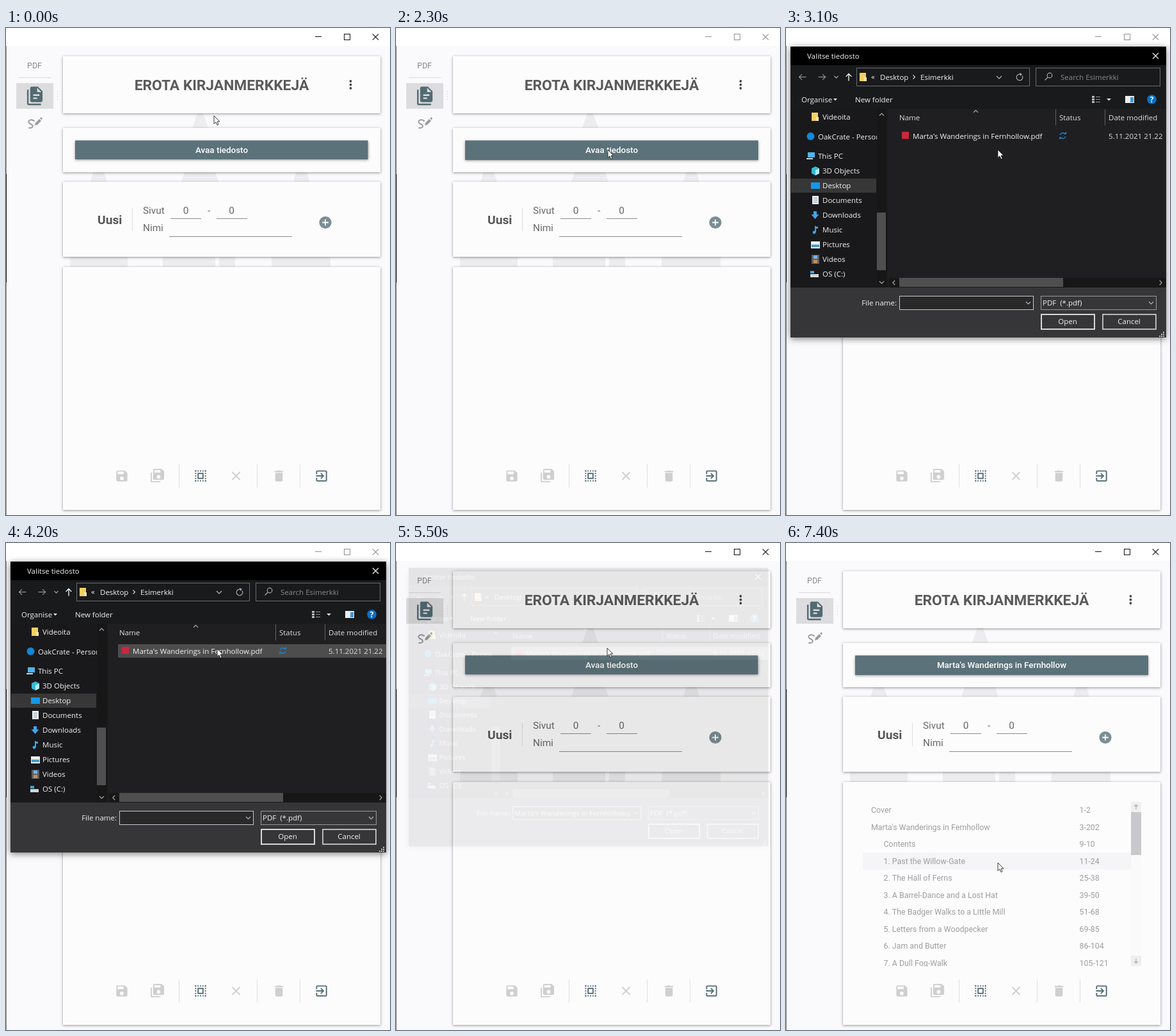
Animation, 600 px wide and 760 px high, one loop 7.6 s. Source, as an HTML page with a canvas:

```html
<!DOCTYPE html>
<html lang="fi">
<head>
<meta charset="utf-8">
<title>Erota kirjanmerkkejä</title>
<style>
html, body { margin: 0; width: 100%; height: 100%; overflow: hidden; background: #fff; }
canvas { display: block; width: 600px; height: 760px; }
</style>
</head>
<body>
<canvas id="stage" width="600" height="760"></canvas>
<script>
const LOOP = 7600, STEP = 100;
const BOOK = "Marta's Wanderings in Fernhollow";
const APP = 'Roboto, sans-serif', SYS = '"Open Sans", "Noto Sans", sans-serif';
const OPEN_AT = 2400, CLOSE_AT = 5400, LIST_AT = 5900;
const main = document.getElementById('stage').getContext('2d');
const layer = document.createElement('canvas');
layer.width = 600; layer.height = 760;
const layerCtx = layer.getContext('2d');
let g = main;

const ICON = {
  save: 'M17 3H5c-1.11 0-2 .9-2 2v14c0 1.1.89 2 2 2h14c1.1 0 2-.9 2-2V7zM12 19a3 3 0 1 1 0-6 3 3 0 0 1 0 6zM15 9H5V5h10z',
  saveAll: 'M17 7V3H7v4zM14 17a3 3 0 1 0 0-6 3 3 0 0 0 0 6zM19 1l4 4v12a2 2 0 0 1-2 2H7c-1.1 0-2-.9-2-2V3a2 2 0 0 1 2-2zM1 7h2v14h14v2H3a2 2 0 0 1-2-2z',
  trash: 'M6 19c0 1.1.9 2 2 2h8c1.1 0 2-.9 2-2V7H6zM19 4h-3.5l-1-1h-5l-1 1H5v2h14z',
  exit: 'M10.1 15.6L11.5 17l5-5-5-5-1.4 1.4 2.6 2.6H3v2h9.7zM19 3H5c-1.1 0-2 .9-2 2v4h2V5h14v14H5v-4H3v4c0 1.1.9 2 2 2h14c1.1 0 2-.9 2-2V5c0-1.1-.9-2-2-2z',
  docs: 'M8 0h8l6 6v12a2 2 0 0 1-2 2H8a2 2 0 0 1-2-2V2a2 2 0 0 1 2-2zM15 1.5V7h5.5zM10 10v2h8v-2zM10 14v2h5v-2zM4 4v18h16v2H4a2 2 0 0 1-2-2V4z',
  add: 'M12 2a10 10 0 1 0 0 20 10 10 0 0 0 0-20zM11 7h2v4h4v2h-4v4h-2v-4H7v-2h4z'
};
for (const k in ICON) ICON[k] = new Path2D(ICON[k]);

function rect(x, y, w, h, c) { g.fillStyle = c; g.fillRect(x, y, w, h); }
function box(x, y, w, h, c, lw = 1) { g.strokeStyle = c; g.lineWidth = lw; g.strokeRect(x + .5, y + .5, w - 1, h - 1); }
function disc(x, y, r, c) { g.fillStyle = c; g.beginPath(); g.arc(x, y, r, 0, 7); g.fill(); }
function poly(pts, fill, stroke, lw = 1) {
  g.beginPath();
  pts.forEach(([x, y], i) => i ? g.lineTo(x, y) : g.moveTo(x, y));
  if (fill) { g.closePath(); g.fillStyle = fill; g.fill(); }
  if (stroke) { g.strokeStyle = stroke; g.lineWidth = lw; g.stroke(); }
}
function text(s, x, y, font, c, align = 'left') {
  g.font = font; g.fillStyle = c; g.textAlign = align; g.fillText(s, x, y);
}
function sys(s, x, y, c = '#f2f2f2', align) { text(s, x, y, '11.5px ' + SYS, c, align); }
function icon(name, cx, cy, c, size = 23) {
  g.save();
  g.translate(cx - size / 2, cy - size / 2);
  g.scale(size / 24, size / 24);
  g.fillStyle = c; g.fill(ICON[name], 'evenodd');
  g.restore();
}
function chevron(x, y, dir, c, r = 3) {
  const turn = { down: 0, left: 1, up: 2, right: 3 }[dir] * Math.PI / 2;
  g.save(); g.translate(x, y); g.rotate(turn);
  poly([[-r, -r / 2], [0, r / 2], [r, -r / 2]], null, c, 1.1);
  g.restore();
}
function arrow(x, y, dir, c, r = 5.5) {
  g.save(); g.translate(x, y); g.rotate({ right: 0, left: Math.PI, up: -Math.PI / 2, down: Math.PI / 2 }[dir]);
  poly([[-r, 0], [r, 0]], null, c, 1.3);
  poly([[r * .2, -r * .8], [r, 0], [r * .2, r * .8]], null, c, 1.3);
  g.restore();
}
function cross(x, y, r, c, lw = 1.1) {
  poly([[x - r, y - r], [x + r, y + r]], null, c, lw);
  poly([[x + r, y - r], [x - r, y + r]], null, c, lw);
}
const smooth = (a, b, t) => { const p = Math.min(1, Math.max(0, (t - a) / (b - a))); return p * p * (3 - 2 * p); };

function card(x, y, w, h, c = '#fdfcfd') {
  g.save();
  g.shadowColor = 'rgba(0,0,0,.42)'; g.shadowBlur = 4; g.shadowOffsetY = 1;
  rect(x, y, w, h, c);
  g.restore();
}

function backdrop() {
  rect(0, 0, 600, 760, '#faf9fb');
  // pale figures that show between the cards
  const c = '#ededef';
  poly([[299, 133], [308, 133], [316, 156], [291, 156]], c);
  poly([[137, 225], [153, 225], [158, 240], [132, 240]], c);
  poly([[279, 225], [327, 225], [332, 240], [274, 240]], c);
  poly([[453, 225], [470, 225], [474, 240], [449, 240]], c);
  [[100, 90], [245, 82], [333, 25], [415, 92]].forEach(([x, w]) => rect(x, 357, w, 16, c));
  rect(0, 0, 600, 28, '#fff');
  rect(0, 28, 1, 732, '#8a8a8c');
  rect(0, 228, 1, 169, '#111');
}

function windowButtons(active) {
  const c = active ? '#111' : '#8f8f8f';
  rect(483, 13, 10, 1, c);
  box(528, 9, 10, 10, c);
  cross(577.5, 14, 4.7, c);
}

function sidebar() {
  text('PDF', 33, 63, '12.5px ' + APP, '#8b8b8d');
  rect(20, 77, 50, 1, '#dadadc');
  rect(16, 86, 58, 40, '#dcdcde');
  icon('docs', 45, 106, '#526a72', 29);
  for (let y = 98; y < 111; y += 4) rect(80, y, 1, 2, '#dedee0');
  g.lineCap = 'round';
  g.strokeStyle = '#9b9b9d'; g.lineWidth = 2;
  g.beginPath();
  g.moveTo(44, 145);
  g.bezierCurveTo(39, 141, 32, 145, 37, 149);
  g.bezierCurveTo(44, 152, 43, 156, 36, 156);
  g.stroke();
  g.lineCap = 'butt';
  poly([[45, 152], [46, 148], [52, 142], [55, 145], [49, 151]], '#9b9b9d');
  poly([[53, 141], [55, 139], [57, 141], [55.5, 143.5]], '#9b9b9d');
}

function selectAll(cx, cy, c) {
  const u = 23 / 24;
  g.save(); g.translate(cx, cy); g.scale(u, u);
  for (let i = -9; i <= 7; i += 4) {
    [-9, 7].forEach(e => { rect(i, e, 2, 2, c); rect(e, i, 2, 2, c); });
  }
  box(-4.5, -4.5, 9, 9, c, 2);
  g.restore();
}

function toolbar() {
  const off = '#cfcfd1', on = '#566e75';
  icon('save', 181, 699, off);
  icon('saveAll', 236.5, 698.5, off);
  selectAll(304, 699, on);
  cross(359.5, 699, 6, off, 1.9);
  icon('trash', 426.5, 699, off);
  icon('exit', 493, 699, on);
  [270, 392, 459].forEach(x => rect(x, 681, 1, 36, '#dedee0'));
}

const ROWS = [
  ['Cover', '1-2'], [BOOK, '3-202'], ['Contents', '9-10'],
  ['1. Past the Willow-Gate', '11-24'], ['2. The Hall of Ferns', '25-38'],
  ['3. A Barrel-Dance and a Lost Hat', '39-50'], ['4. The Badger Walks to a Little Mill', '51-68'],
  ['5. Letters from a Woodpecker', '69-85'], ['6. Jam and Butter', '86-104'], ['7. A Dull Fog-Walk', '105-121']
];
function bookmarks(cursorY) {
  const pitch = 26.55, top = 403.5, font = '12.4px ' + APP;
  const over = Math.floor((cursorY - top) / pitch);
  g.save();
  g.beginPath(); g.rect(114, 403, 442, 258); g.clip();
  if (over >= 0 && over < ROWS.length) rect(120, top + over * pitch, 420, pitch, '#f5f4f6');
  ROWS.forEach(([name, pages], i) => {
    const y = 421 + i * pitch;
    text(name, i < 2 ? 133 : 152.5, y, font, '#9d9d9f');
    text(pages, 458.5, y, font, '#9d9d9f');
  });
  rect(539, 404, 16, 256, '#fafafb');
  rect(539, 404, 16, 16, '#efeff0');
  rect(539, 644, 16, 16, '#efeff0');
  rect(539, 420, 16, 67, '#c9c9cb');
  arrow(547, 412, 'up', '#b0b0b2', 3.5);
  arrow(547, 652, 'down', '#b0b0b2', 3.5);
  g.restore();
}

function app(t, cur) {
  backdrop();
  windowButtons(t < 2300 || t > CLOSE_AT);
  sidebar();
  card(89, 44, 496, 89);
  card(89, 156, 496, 69);
  card(89, 240, 496, 117);
  card(89, 373, 496, 379);

  text('EROTA KIRJANMERKKEJÄ', 337, 97, '700 22.8px ' + APP, '#5a5a5a', 'center');
  [83, 88.5, 94].forEach(y => disc(538.5, y, 1.9, '#454b4d'));

  const loaded = t >= LIST_AT;
  const raised = loaded || (t < OPEN_AT && cur[1] > 175 && cur[1] < 206);
  card(108, 175.5, raised ? 458 : 457.5, raised ? 30.5 : 29.5, '#5b727a');
  text(loaded ? BOOK : 'Avaa tiedosto', 337, 195, '500 13.4px ' + APP, '#fff', 'center');

  const f = '15.3px ' + APP, c = '#666668';
  text('Uusi', 143, 305.5, '700 19.2px ' + APP, '#555557');
  rect(197, 281, 1, 36, '#dedee0');
  text('Sivut', 214, 290, f, c);
  text('Nimi', 214, 317, f, c);
  text('0', 281, 290, f, c, 'center');
  text('-', 317, 290, f, c, 'center');
  text('0', 352.5, 290, f, c, 'center');
  rect(257, 297, 48, 1, '#8c8c8e');
  rect(329, 297, 48, 1, '#8c8c8e');
  rect(255, 325, 192, 1, '#8c8c8e');
  icon('add', 499, 303.5, '#7b8e95');
  if (loaded) bookmarks(cur[1]);
  toolbar();
}

function folder(x, y) { rect(x, y, 10, 13, '#f4cf63'); rect(x + 7, y + 7, 4, 6, '#fbe9a8'); }
function page(x, y) { rect(x, y, 10, 13, '#f2f2f2'); }

function placeIcons(ready) {
  folder(40, 132);
  if (ready) {
    disc(38.5, 169, 6, '#1486d8');
    rect(34, 194, 11, 8, '#4db5ea'); rect(32, 203, 10, 2, '#cfd6da');
    poly([[40, 219], [46, 216], [52, 219], [52, 227], [46, 230], [40, 227]], '#35b9d6');
    poly([[46, 222], [52, 219], [52, 227], [46, 230]], '#b5e8f2');
    rect(39, 241, 14, 10, '#1598e6');
    page(41, 262);
    for (let y = 265; y < 273; y += 3) rect(43, y, 6, 1, '#6f97b5');
    rect(45, 309, 2, 10, '#3aa5ee'); disc(44, 319, 2.4, '#3aa5ee'); rect(46, 310, 4, 3, '#3aa5ee');
    rect(38, 384, 13, 5, '#d3d7d9'); rect(38, 379, 6, 4, '#39a6e6');
  } else page(40, 377);
  rect(43, 286, 5, 6, '#42a5e8');
  poly([[39.5, 291], [51.5, 291], [45.5, 298]], '#42a5e8');
  rect(39, 333, 14, 11, '#e8eef0'); rect(40, 338, 12, 4, '#4a9cc4');
  rect(40, 354, 12, 14, '#5c6064'); rect(43, 355, 6, 5, '#7fb2dc'); rect(43, 362, 6, 5, '#c98f58');
}

function addressBar() {
  arrow(26, 76.5, 'left', '#8d8d8d');
  arrow(56, 76.5, 'right', '#8d8d8d');
  chevron(78.5, 76.5, 'down', '#aaa');
  arrow(98, 77, 'up', '#fff');
  box(110, 62, 271, 29, '#6b6b6b');
  box(390, 62, 195, 29, '#6b6b6b');
  folder(115, 70);
  sys('«', 133, 80);
  sys('Desktop', 147, 80.5);
  chevron(200, 76.5, 'right', '#ddd');
  sys('Esimerkki', 210, 80.5);
  chevron(333, 77, 'down', '#bbb', 4);
  g.strokeStyle = '#aaa'; g.lineWidth = 1.2;
  g.beginPath(); g.arc(365, 77, 4.8, -.6, 4.9); g.stroke();
  poly([[365, 70], [369, 72], [366, 75]], '#aaa');
  g.beginPath(); g.arc(412, 74, 3.8, 0, 7); g.stroke();
  poly([[409, 77], [404.5, 81.5]], null, '#aaa', 1.2);
  sys('Search Esimerkki', 429, 80.5, '#8a8a8a');
  sys('Organise', 24, 116);
  poly([[74, 110], [80, 110], [77, 113.5]], '#ddd');
  sys('New folder', 108, 116);
  for (let y = 106; y < 117; y += 4) { rect(478, y, 4, 3, '#bbb'); rect(484, y + 1, 7, 1, '#999'); }
  poly([[501, 110], [508, 110], [504.5, 113.5]], '#ddd');
}

function fields(ready, picked) {
  if (!ready) {
    rect(121, 421, 52, 15, '#fff');
    rect(177, 418, 210, 22, '#fff'); rect(398, 418, 181, 22, '#fff');
    rect(398, 446, 84, 25, '#fff'); rect(494, 446, 84, 25, '#fff');
    rect(578, 466, 16, 17, '#fff');
    return;
  }
  sys('File name:', 173, 433, '#f2f2f2', 'right');
  rect(177, 418, 210, 22, '#29292a'); box(177, 418, 210, 22, '#c8c8c8');
  if (picked) {
    g.save(); g.beginPath(); g.rect(178, 419, 191, 20); g.clip();
    sys(BOOK + '.pdf', 180, 433);
    g.restore();
  }
  chevron(378.5, 429, 'down', '#bbb', 3.5);
  box(398, 418, 181, 22, '#9a9a9a');
  sys('PDF  (*.pdf)', 401, 433);
  chevron(570.5, 429, 'down', '#bbb', 3.5);
  box(398.5, 446.5, 84, 24, '#f4f4f4', 1.7);
  box(494.5, 446.5, 84, 24, '#e4e4e4', 1.5);
  sys('Open', 440, 462, '#f2f2f2', 'center');
  sys('Cancel', 536, 462, '#f2f2f2', 'center');
  for (let i = 0; i < 3; i++) for (let j = 0; j <= i; j++) rect(589 - j * 3, 474 + i * 3, 2, 2, '#bdbdbd');
}

const PLACES = [[57, 143, 'Videoita'], [50, 173.5, 'OakCrate - Person'], [50, 204, 'This PC']].concat(
  ['3D Objects', 'Desktop', 'Documents', 'Downloads', 'Music', 'Pictures', 'Videos', 'OS (C:)']
    .map((s, i) => [57, 227 + i * 23, s]));

function dialog(ready, hover, picked) {
  g.save();
  g.shadowColor = 'rgba(0,0,0,.5)'; g.shadowBlur = 10; g.shadowOffsetY = 2;
  rect(7, 29, 587, 454, '#1f1f21');
  g.restore();
  rect(7, 29, 587, 29, '#000');
  sys('Valitse tiedosto', 33, 48);
  cross(577.5, 43.5, 4.5, '#eee', 1.2);
  rect(7, 58, 587, 68, '#191a1c');
  if (ready) addressBar();
  else rect(7, 58, 587, 39, '#fff');
  rect(530, 106, 14, 11, '#e9eff3'); rect(538, 108, 5, 8, '#3f9bd5');
  disc(571.5, 111.5, 7.3, '#0b6fc6');
  text('?', 571.5, 116, '700 12px ' + SYS, '#fff', 'center');

  rect(7, 126, 152, 279, '#19191b');
  rect(8, 235, 133, 22, '#373738');
  placeIcons(ready);
  PLACES.forEach(([x, y, s]) => sys(s, x, y));
  rect(142, 126, 15, 279, '#171718');
  rect(142, 288, 14, 90, '#4f4f50');
  chevron(149.5, 135, 'up', '#aaa', 3.5);
  chevron(149.5, 397, 'down', '#aaa', 3.5);

  sys('Name', 177, 144, '#dedede');
  sys('Status', 427, 144, '#dedede');
  sys('Date modified', 504, 144, '#dedede');
  chevron(296.5, 130, 'up', '#aaa', 3.5);
  rect(421, 127, 1, 25, '#626263');
  rect(498, 127, 1, 25, '#626263');
  if (picked || hover) rect(175, 158, 419, 21, picked ? '#777778' : '#4d4d4e');
  if (picked) box(175, 158, 419, 21, '#8a8a8b');
  if (ready) {
    rect(181, 162, 11, 11, '#c9283e');
    g.strokeStyle = '#1683cf'; g.lineWidth = 1.5;
    [.25, 3.4].forEach(a => { g.beginPath(); g.arc(432.5, 168, 4.3, a, a + 2.4); g.stroke(); });
    poly([[434, 165], [438, 162], [438, 166]], '#1683cf');
    poly([[431, 171], [427, 174], [427, 170]], '#1683cf');
  } else page(181, 161);
  sys(BOOK + '.pdf', 198, 172.5);
  sys('5.11.2021 21.22', 504, 172.5, '#dedede');

  rect(161, 390, 433, 15, '#171718');
  rect(177, 390, 256, 14, '#4f4f50');
  chevron(168.5, 397.5, 'left', '#aaa', 3.5);
  chevron(585.5, 397.5, 'right', '#aaa', 3.5);
  rect(7, 405, 587, 78, '#363638');
  fields(ready, picked);
}

// opacity and scale of the dialog window
function pose(t) {
  if (t < OPEN_AT || t >= CLOSE_AT + 200) return null;
  if (t < OPEN_AT + 100) return [.35, .965];
  if (t < OPEN_AT + 200) return [.77, .986];
  if (t < CLOSE_AT) return [1, 1];
  return t < CLOSE_AT + 100 ? [.5, .98] : [.085, .957];
}

function showDialog(t, cur) {
  const p = pose(t);
  if (!p) return;
  g = layerCtx;
  g.clearRect(0, 0, 600, 760);
  dialog(t >= OPEN_AT + 200, cur[1] < 179, t >= 5000);
  g = main;
  g.save();
  g.globalAlpha = p[0];
  g.translate(300.5, 255.5); g.scale(p[1], p[1]); g.translate(-300.5, -255.5);
  g.drawImage(layer, 0, 0);
  g.restore();
}

function cursorAt(t) {
  const a = smooth(500, 1700, t), b = smooth(3400, 4300, t), c = smooth(6100, 7200, t);
  return [325 + 6 * a - b + c, 137 + 53 * a - 26 * b + 335 * c];
}
function pointer([x, y]) {
  g.save(); g.translate(x, y);
  poly([[0, 0], [0, 12.5], [2.9, 9.8], [5, 14.6], [7, 13.7], [5, 9], [8.8, 9], [0, 0]], '#fff', '#222', .9);
  g.restore();
}

function frame(now) {
  const t = Math.min(7400, Math.floor((now % LOOP) / STEP) * STEP);
  const cur = cursorAt(t);
  app(t, cur);
  showDialog(t, cur);
  pointer(cur);
}

let start;
function tick(now) {
  if (start === undefined) start = now;
  frame(Math.max(0, now - start));
  requestAnimationFrame(tick);
}
frame(0);
requestAnimationFrame(tick);
</script>
</body>
</html>
```
